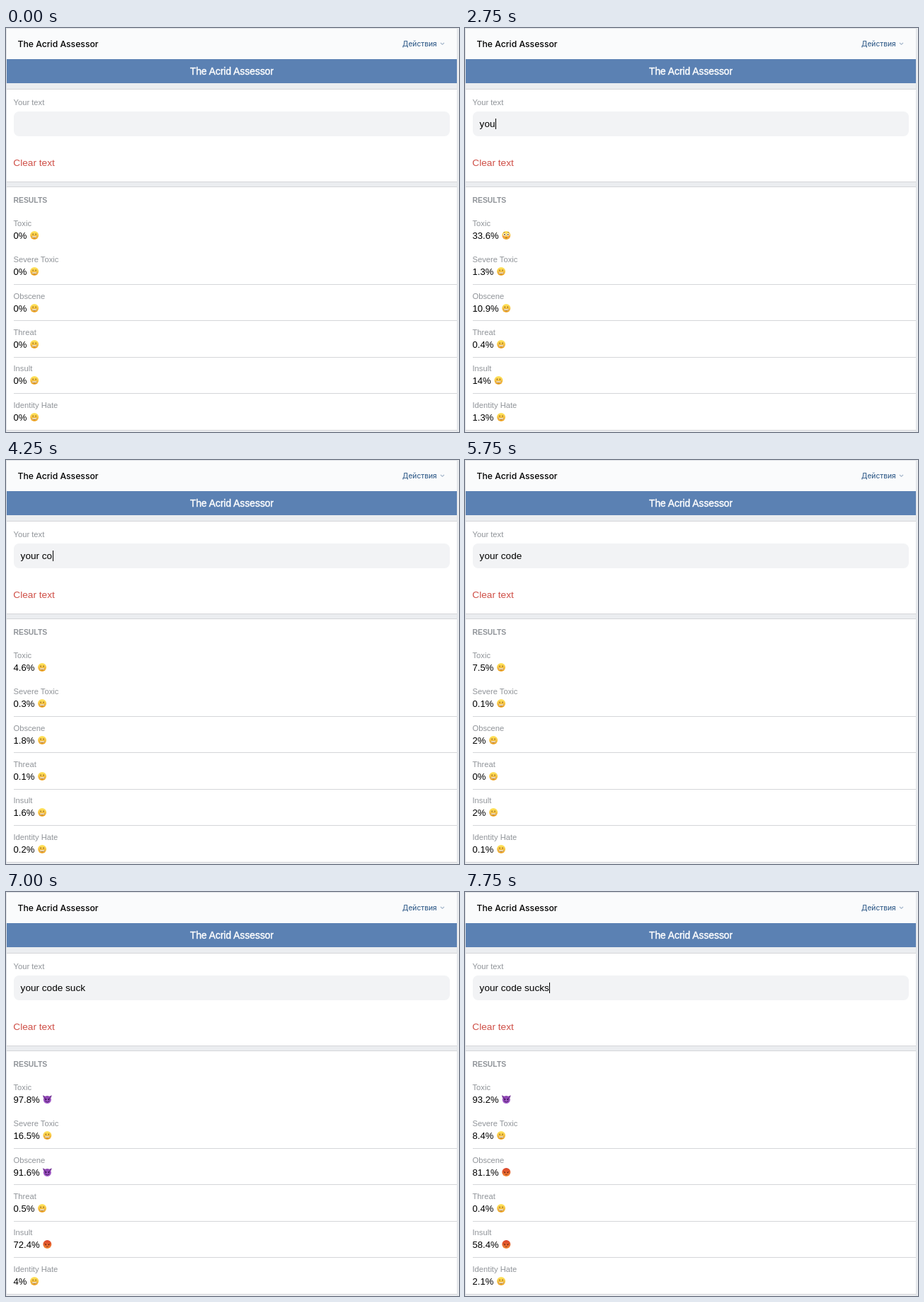
These frames come from a looping animation (640x571 px, 8 s). An HTML page:

```html
<!DOCTYPE html>
<html lang="en">
<head>
<meta charset="utf-8">
<title>The Acrid Assessor</title>
<style>
  html, body { margin: 0; width: 100%; height: 100%; overflow: hidden; background: #ebedf0; }
  svg { display: block; width: 640px; height: 571px; }
  text { font-family: "Liberation Sans", Arial, sans-serif; white-space: pre; }
  .ui { font-family: Inter, sans-serif; font-weight: 500; }
  .label { font-size: 11.2px; fill: #909499; }
  .value { font-size: 13.1px; fill: #000; }
  .typed { font-size: 13.6px; fill: #000; }
  .rule { fill: #d5d6d9; }
</style>
</head>
<body>
<svg viewBox="0 0 640 571">
  <defs>
    <linearGradient id="sun" x2="0" y2="1">
      <stop offset="0" stop-color="#ffe65c"/><stop offset="1" stop-color="#f0a52c"/>
    </linearGradient>
    <linearGradient id="fire" x2="0" y2="1">
      <stop offset="0" stop-color="#d9402a"/><stop offset="1" stop-color="#f58a34"/>
    </linearGradient>
    <linearGradient id="plum" x2="0" y2="1">
      <stop offset="0" stop-color="#8a3fae"/><stop offset="1" stop-color="#a85fd0"/>
    </linearGradient>
    <g id="grin">
      <circle r="6" fill="url(#sun)"/>
      <ellipse cx="-2" cy="-1.5" rx=".7" ry="1" fill="#80551a"/>
      <ellipse cx="2" cy="-1.5" rx=".7" ry="1" fill="#80551a"/>
      <path d="M-4 1Q0 1.8 4 1Q3.4 4 0 4T-4 1Z" fill="#a56a22"/>
      <path d="M-3.6 1.2Q0 2 3.6 1.2L3 2.8Q0 3.4-3 2.8Z" fill="#fff6dc"/>
    </g>
    <g id="flushed">
      <circle r="6" fill="url(#sun)"/>
      <circle cx="-3.7" cy="1.8" r="1.6" fill="#f08a4a" opacity=".7"/>
      <circle cx="3.7" cy="1.8" r="1.6" fill="#f08a4a" opacity=".7"/>
      <circle cx="-2.4" cy="-1" r="1.9" fill="#fff"/>
      <circle cx="2.4" cy="-1" r="1.9" fill="#fff"/>
      <circle cx="-2.4" cy="-1" r=".9" fill="#5e3c14"/>
      <circle cx="2.4" cy="-1" r=".9" fill="#5e3c14"/>
      <path d="M-1.5 3.4H1.5M-3.8-3.9L-2-4.3M3.8-3.9L2-4.3" stroke="#7a4a16" stroke-width=".8"/>
    </g>
    <g id="rage">
      <circle r="6" fill="url(#fire)"/>
      <path d="M-3.8-.8L-1 .3M3.8-.8L1 .3" stroke="#7a2415" stroke-width=".8"/>
      <circle cx="-2.2" cy=".8" r=".8" fill="#5e1c12"/>
      <circle cx="2.2" cy=".8" r=".8" fill="#5e1c12"/>
      <path d="M-1.6 3.7Q0 2.6 1.6 3.7" fill="none" stroke="#7a2415" stroke-width=".8"/>
    </g>
    <g id="devil">
      <path d="M-6.2-6Q-6.3-2.6-4-1.2L-1.7-4Q-4.6-4-6.2-6ZM6.2-6Q6.3-2.6 4-1.2L1.7-4Q4.6-4 6.2-6Z" fill="#6f2f91"/>
      <circle cy=".6" r="5.5" fill="url(#plum)"/>
      <path d="M-3.8-1.5L-.9 0M3.8-1.5L.9 0" stroke="#35104c" stroke-width=".9"/>
      <circle cx="-2.2" cy=".4" r=".9" fill="#35104c"/>
      <circle cx="2.2" cy=".4" r=".9" fill="#35104c"/>
      <path d="M-3 2.6Q0 5.4 3 2.6" fill="none" stroke="#35104c" stroke-width=".9"/>
    </g>
  </defs>

  <rect width="640" height="571" fill="#ebedf0"/>
  <rect x="1" y="1" width="636" height="43" fill="#fafbfc"/>
  <rect x="1" y="44" width="636" height="34" fill="#5b81b3"/>
  <rect x="1" y="87" width="636" height="130" fill="#fff"/>
  <rect x="1" y="225" width="636" height="343" fill="#fff"/>
  <g class="rule">
    <rect x="1" y="86" width="636" height="1"/>
    <rect x="1" y="217" width="636" height="1"/>
    <rect x="1" y="224" width="636" height="1"/>
    <rect x="1" y="568" width="636" height="1"/>
  </g>
  <path d="M.5 571V.5H637.5V571" fill="none" stroke="#dfe2e7"/>

  <text class="ui" x="16.5" y="27" font-size="12.2">The Acrid Assessor</text>
  <text class="ui" x="560" y="26" font-size="10.1" fill="#3d6590">Действия</text>
  <path d="M614 21L616.5 23.3L619 21" fill="none" stroke="#9fb2c8" stroke-width="1.1"/>
  <text x="319" y="66" text-anchor="middle" font-size="13.8" fill="#fff" stroke="#fff" stroke-width=".4">The Acrid Assessor</text>

  <text class="label" x="10.5" y="109">Your text</text>
  <rect x="11" y="118" width="616" height="35" rx="7.5" fill="#f2f3f5"/>
  <text class="typed" id="typed" x="20.6" y="140"></text>
  <rect id="caret" y="128" width="1" height="15"/>
  <text x="10.3" y="195" font-size="13.7" fill="#cf5048">Clear text</text>
  <text x="10.5" y="247" font-size="10.4" font-weight="bold" fill="#909499">RESULTS</text>
  <g id="rows"></g>
</svg>
<script>
const LOOP = 8000;
const names = ["Toxic", "Severe Toxic", "Obscene", "Threat", "Insult", "Identity Hate"];

// [time, typed text, caret visible]
const typing = [
  [0, "", 0], [1250, "", 1], [1500, "", 0], [2000, "", 1],
  [2500, "yo", 1], [2750, "you", 1], [3000, "your", 1], [3500, "your ", 1],
  [4000, "your c", 1], [4250, "your co", 1], [4500, "your cod", 1],
  [4750, "your code", 1], [5250, "your code ", 1], [5750, "your code ", 0],
  [6000, "your code s", 1], [6250, "your code su", 1],
  [6500, "your code suck", 1], [7000, "your code suck", 0],
  [7500, "your code suck", 1], [7750, "your code sucks", 1]
];

// [time, score for each row]
const scores = [
  [0, [0, 0, 0, 0, 0, 0]],
  [2500, [14.2, 0.7, 5.1, 0.3, 4.8, 0.8]],
  [2750, [33.6, 1.3, 10.9, 0.4, 14, 1.3]],
  [3000, [6.8, 0.2, 2.1, 0.2, 2.3, 0.3]],
  [4000, [5.2, 0.4, 2.2, 0.2, 1.9, 0.3]],
  [4250, [4.6, 0.3, 1.8, 0.1, 1.6, 0.2]],
  [4750, [7.5, 0.1, 2, 0, 2, 0.1]],
  [6000, [8.3, 0.2, 2.4, 0.1, 2.3, 0.2]],
  [6250, [9.1, 0.3, 2.9, 0.1, 2.7, 0.3]],
  [6500, [97.8, 16.5, 91.6, 0.5, 72.4, 4]],
  [7750, [93.2, 8.4, 81.1, 0.4, 58.4, 2.1]]
];

const $ = id => document.getElementById(id);
const pen = document.createElement("canvas").getContext("2d");
const width = (str, size) => {
  pen.font = size + 'px "Liberation Sans", Arial, sans-serif';
  return pen.measureText(str).width;
};
const at = (list, t) => list.filter(step => step[0] <= t).pop();
const mood = v => v >= 90 ? "devil" : v >= 50 ? "rage" : v >= 25 ? "flushed" : "grin";

function add(tag, attrs, str = "") {
  const el = document.createElementNS("http://www.w3.org/2000/svg", tag);
  for (const key in attrs) el.setAttribute(key, attrs[key]);
  el.textContent = str;
  return $("rows").appendChild(el);
}

const rows = names.map((name, i) => {
  const top = 259.2 + 51.4 * i;
  const y = Math.round(top + 20.6);
  add("text", { class: "label", x: 10.5, y }, name);
  if (i > 1) add("rect", { class: "rule", x: 11, y: Math.round(top), width: 626, height: 1 });
  return {
    y: y + 13,
    value: add("text", { class: "value", x: 10.5, y: y + 18 }),
    face: add("use", {})
  };
});

function draw(t) {
  const [, str, on] = at(typing, t);
  $("typed").textContent = str;
  $("caret").setAttribute("x", Math.round(21 + width(str, 13.6)));
  $("caret").setAttribute("opacity", on);
  at(scores, t)[1].forEach((v, i) => {
    const { y, value, face } = rows[i];
    const label = v + "%";
    const x = 11 + width(label, 13.1) + 10.2;
    value.textContent = label;
    face.setAttribute("href", "#" + mood(v));
    face.setAttribute("transform", `translate(${x} ${y})`);
  });
}

const start = performance.now();
function tick() {
  draw((performance.now() - start) % LOOP);
  requestAnimationFrame(tick);
}
tick();
</script>
</body>
</html>
```
